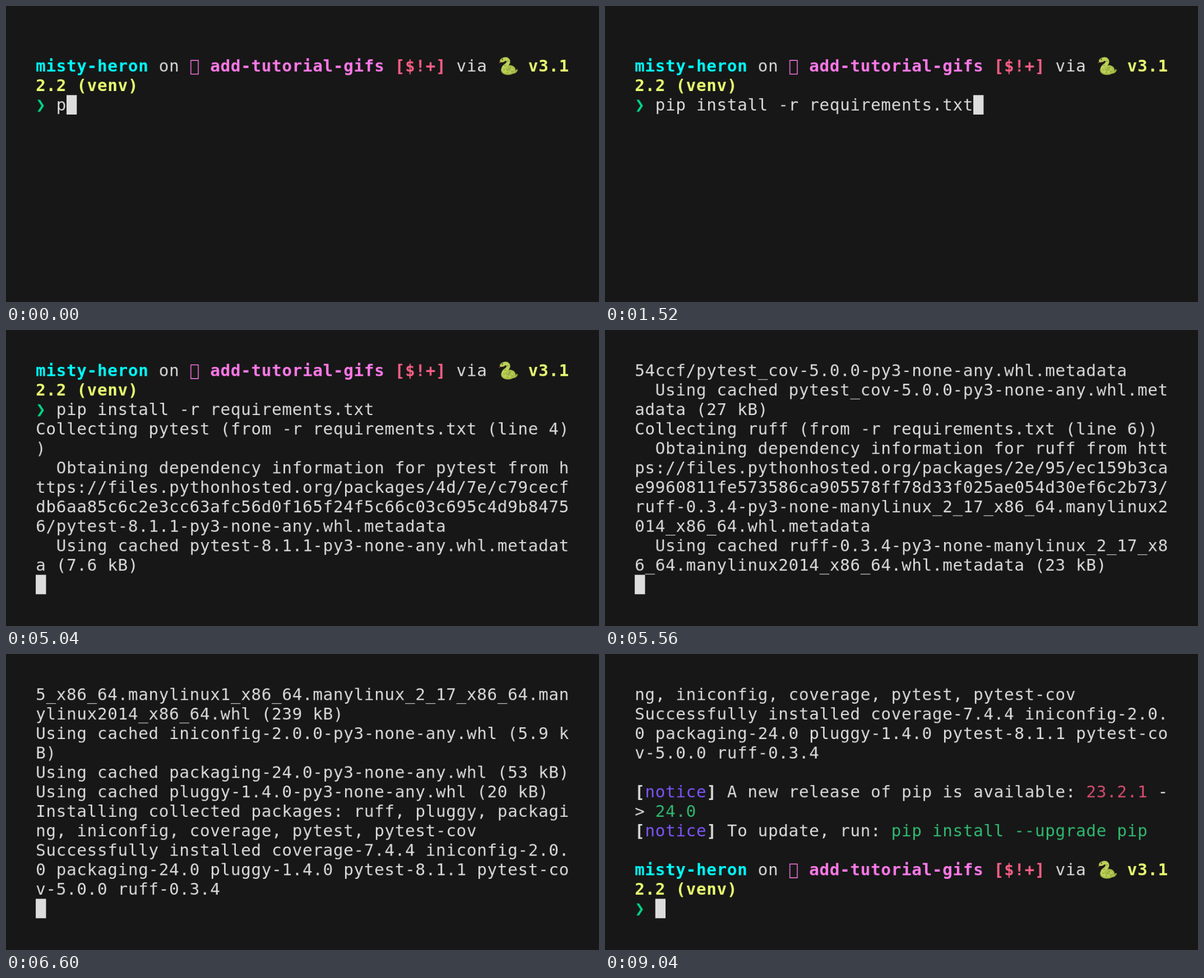
These frames come from a looping animation (1058 px wide and 529 px high, 9.4 s). An HTML page with a canvas:

```html
<!DOCTYPE html>
<html lang="en">
<head>
<meta charset="utf-8">
<title>Terminal</title>
<style>
  html, body { margin: 0; width: 100%; height: 100%; overflow: hidden; background: #171717; }
  canvas { display: block; }
</style>
</head>
<body>
<canvas id="screen" width="1058" height="529"></canvas>
<script>
const stage = document.getElementById('screen');
const stageCtx = stage.getContext('2d');

// The terminal is drawn on whole-pixel cells, then scaled down to the stage.
const terminal = document.createElement('canvas');
terminal.width = 1156;
terminal.height = 578;
const ctx = terminal.getContext('2d');

const LOOP = 9400, STEP = 40;
const COLS = 52, ROWS = 12, CELL_W = 20, CELL_H = 38, BASELINE = 30;
const LEFT = 58, TOP = 60;
const FONT = '32px "DejaVu Sans Mono", monospace';
const BRANCH = '\ue0a0', SNAKE = '🐍';
const BACKGROUND = '#171717', WHITE = '#dddddd', RED = '#d74e6f', GREEN = '#31bb71', BLUE = '#8056ff';

// A line is a list of spans; it becomes one or more rows of cells.
const span = (text, color = WHITE, bold = false) => ({ text, color, bold });
const bold = (text, color) => span(text, color, true);

function wrap(line) {
  const spans = typeof line === 'string' ? [span(line)] : line;
  const cells = [];
  for (const { text, color, bold } of spans) {
    for (const char of text) {
      cells.push({ char, color, bold });
      if (char === SNAKE) cells.push({ char: ' ' });
    }
  }
  const rows = [];
  do rows.push(cells.splice(0, COLS)); while (cells.length);
  return rows;
}

const COMMAND = 'pip install -r requirements.txt';
const promptLine = [
  bold('misty-heron', '#00fefe'), span(' on '),
  bold(BRANCH + ' add-tutorial-gifs ', '#ff7aea'), bold('[$!+]', '#fe5f86'),
  span(' via ' + SNAKE + ' '), bold('v3.12.2 (venv)', '#ebff71'),
];
const inputLine = text => [bold('❯', '#00d787'), span(' ' + text)];
const notice = (...rest) => [bold('['), span('notice', BLUE), bold(']'), ...rest];

const collect = (name, origin, line, path, wheel, size) => [
  `Collecting ${name} (from ${origin}-r requirements.txt (line ${line}))`,
  `  Obtaining dependency information for ${name} from https://files.pythonhosted.org/packages/${path}/${wheel}.whl.metadata`,
  `  Using cached ${wheel}.whl.metadata (${size} kB)`,
];
const cached = (wheel, size) => `Using cached ${wheel}.whl (${size})`;

const PY3 = '-py3-none-any';
const PYTEST = 'pytest-8.1.1' + PY3, COV = 'pytest_cov-5.0.0' + PY3;
const INICONFIG = 'iniconfig-2.0.0' + PY3, PACKAGING = 'packaging-24.0' + PY3, PLUGGY = 'pluggy-1.4.0' + PY3;
const LINUX = 'manylinux_2_17_x86_64.manylinux2014_x86_64';
const RUFF = 'ruff-0.3.4-py3-none-' + LINUX;
const COVERAGE = 'coverage-7.4.4-cp312-cp312-manylinux_2_5_x86_64.manylinux1_x86_64.' + LINUX;

const ENTER = 4480, DONE = 6720;
const output = [
  [5040, collect('pytest', '', 4, '4d/7e/c79cecfdb6aa85c6c2e3cc63afc56d0f165f24f5c66c03c695c4d9b84756', PYTEST, '7.6')],
  [5080, collect('pytest-cov', '', 5, '78/3a/af5b4fa5961d9a1e6237b530eb87dd04aea6eb83da09d2a4073d81b54ccf', COV, '27')],
  [5560, collect('ruff', '', 6, '2e/95/ec159b3cae9960811fe573586ca905578ff78d33f025ae054d30ef6c2b73', RUFF, '23')],
  [5680, collect('iniconfig', 'pytest->', 4, 'ef/a6/62565a6e1cf69e10f5727360368e451d4b7f58beeac6173dc9db836a5b46', INICONFIG, '2.6')],
  [5720, collect('packaging', 'pytest->', 4, '49/df/1fceb2f8900f8639e278b056416d49134fb8d84c5942ffaa01ad34782422', PACKAGING, '3.2')],
  [5800, collect('pluggy<2.0,>=1.4', 'pytest->', 4, 'a5/5b/0cc789b59e8cc1bf288b38111d002d8c5917123194d45b29dcdac64723cc', PLUGGY, '4.3')],
  [6160, [
    ...collect('coverage[toml]>=5.2.1', 'pytest-cov->', 5, '98/79/185cb42910b6a2b2851980407c8445ac0da0750dff65e420e86f973c8396', COVERAGE, '8.2'),
    cached(PYTEST, '337 kB'), cached(COV, '21 kB'),
  ]],
  [6200, [cached(RUFF, '8.7 MB'), cached(COVERAGE, '239 kB'), cached(INICONFIG, '5.9 kB')]],
  [6240, [
    cached(PACKAGING, '53 kB'), cached(PLUGGY, '20 kB'),
    'Installing collected packages: ruff, pluggy, packaging, iniconfig, coverage, pytest, pytest-cov',
  ]],
  [6600, ['Successfully installed coverage-7.4.4 iniconfig-2.0.0 packaging-24.0 pluggy-1.4.0 pytest-8.1.1 pytest-cov-5.0.0 ruff-0.3.4']],
  [6640, ['', notice(span(' A new release of pip is available: '), span('23.2.1', RED), span(' -> '), span('24.0', GREEN))]],
  [6680, [notice(span(' To update, run: '), span('pip install --upgrade pip', GREEN))]],
  [DONE, ['', promptLine, inputLine('')]],
].map(([time, lines]) => [time, lines.flatMap(wrap)]);

const header = ['', promptLine].flatMap(wrap);

function rowsAt(time) {
  const typed = 1 + Math.floor((time + 4) / 49.6);
  const rows = [...header, ...wrap(inputLine(COMMAND.slice(0, typed)))];
  for (const [start, added] of output) if (time >= start) rows.push(...added);
  if (time >= ENTER && time < DONE) rows.push([]);
  return rows.slice(-ROWS);
}

const hiddenSpans = [[2080, 2680], [3240, 3840], [4440, ENTER], [7280, 7880], [8480, 9040]];
const cursorVisible = time => !hiddenSpans.some(([from, to]) => time >= from && time < to);

function stroke(path, color, width) {
  ctx.strokeStyle = color;
  ctx.lineWidth = width;
  ctx.stroke(new Path2D(path));
}

function dot(x, y, radius, color) {
  ctx.fillStyle = color;
  ctx.beginPath();
  ctx.arc(x, y, radius, 0, 2 * Math.PI);
  ctx.fill();
}

function drawSnake(x, y) {
  ctx.save();
  ctx.translate(x + 3, y + 1);
  ctx.scale(1.09, 1.09);
  ctx.lineCap = ctx.lineJoin = 'round';
  stroke('M3 9 L0.5 11', '#d9433f', 1.3);
  stroke('M21 28 C27 30 30 28 32 24', '#9fb544', 3);
  stroke('M7 23 C6 31 23 31 26 25 C28 19 18 16 14 21', '#a9bf48', 6.5);
  stroke('M6 6 C14 1 20 7 15 13 C11 17 7 18 8 23 C11 28 20 27 22 23', '#bdd158', 6.5);
  stroke('M13 23 C16 26 20 25 21 22', '#8da33b', 1.2);
  stroke('M4 7.5 L8 7', '#bdd158', 5);
  for (const [px, py] of [[16, 8], [11, 16], [9, 23], [15, 28], [23, 26], [20, 20]]) dot(px, py, 1.2, '#849c38');
  dot(6, 5, 1.1, '#303522');
  ctx.restore();
}

function drawCell({ char, color, bold }, x, y) {
  if (char === SNAKE) return drawSnake(x, y);
  if (char === BRANCH) {
    ctx.strokeStyle = color;
    ctx.lineWidth = 1.6;
    return ctx.strokeRect(x + 2.4, y + 8.2, 14.4, 26.7);
  }
  if (char === ' ') return;
  ctx.font = (bold ? 'bold ' : '') + FONT;
  ctx.fillStyle = color;
  ctx.fillText(char, x, y + BASELINE);
}

function draw(time) {
  ctx.fillStyle = BACKGROUND;
  ctx.fillRect(0, 0, terminal.width, terminal.height);
  const rows = rowsAt(time);
  rows.forEach((row, r) => row.forEach((cell, c) => drawCell(cell, LEFT + c * CELL_W, TOP + r * CELL_H)));
  if (cursorVisible(time)) {
    const last = rows.length - 1;
    ctx.fillStyle = WHITE;
    ctx.fillRect(LEFT + rows[last].length * CELL_W, TOP + last * CELL_H, CELL_W, CELL_H);
  }
  stageCtx.drawImage(terminal, 0, 0, stage.width, stage.height);
}

function tick() {
  draw(Math.floor(performance.now() % LOOP / STEP) * STEP);
  requestAnimationFrame(tick);
}
tick();
</script>
</body>
</html>
```
